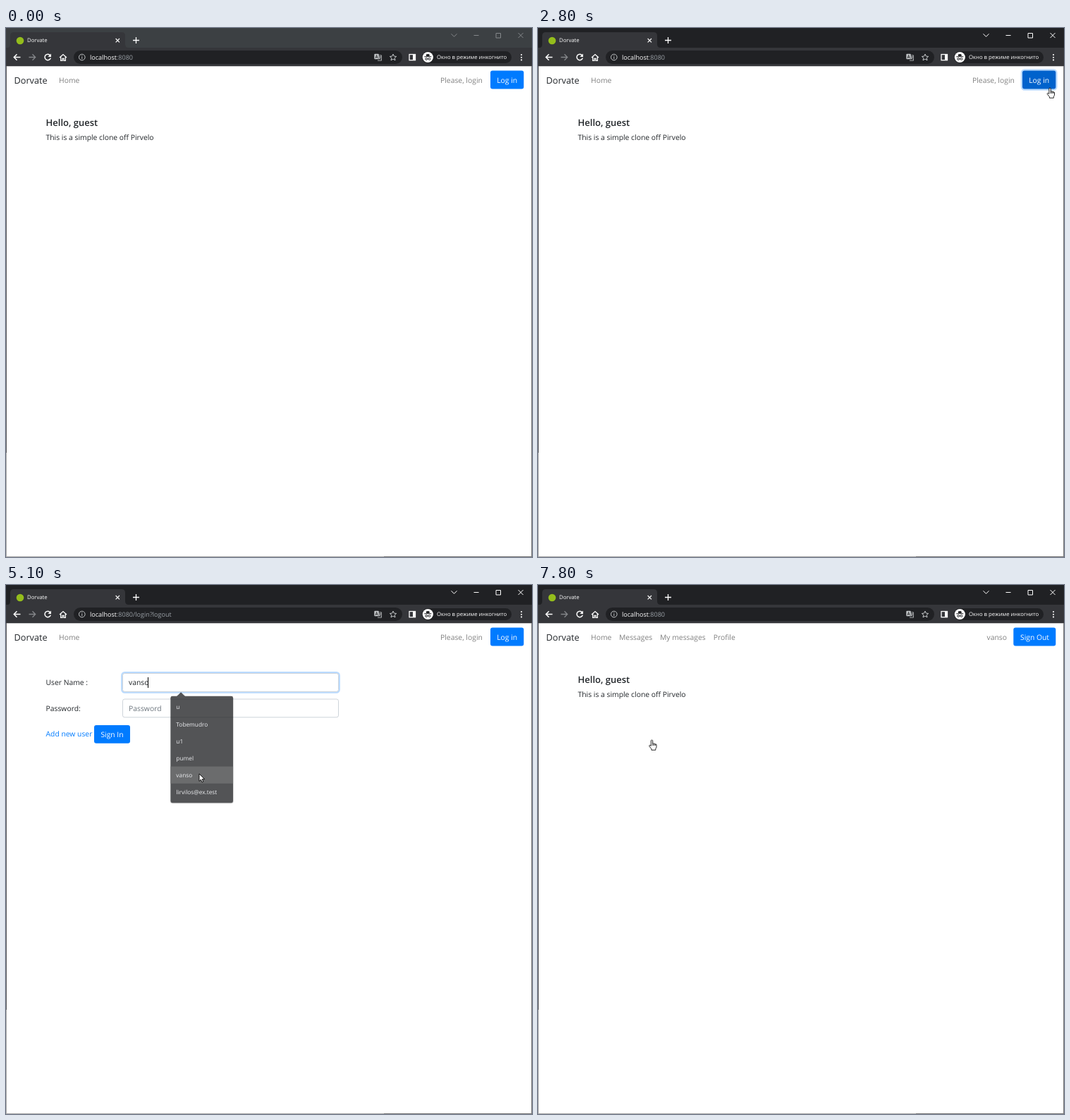
Animation, 746 px wide and 751 px high, one loop 8 s. Source, as an HTML page:

```html
<!DOCTYPE html>
<html lang="en">
<head>
<meta charset="utf-8">
<title>Dorvate</title>
<style>
html, body { margin: 0; width: 100%; height: 100%; overflow: hidden; background: #fff; }
svg { display: block; width: 100%; height: 100%; }
text { font: 10.35px "Open Sans", "Noto Sans", sans-serif; fill: #212529; text-rendering: geometricPrecision; white-space: pre; }
.brand { font-size: 12.7px; }
.head { font-size: 13px; font-weight: 600; }
.ui { font-size: 7.73px; fill: #fff; }
.url { font-size: 9.05px; fill: #fff; }
.nav { fill: #808080; }
.hint { fill: #6c757d; }
.link { fill: #007bff; }
.btn { fill: #fff; text-anchor: middle; }
.small, .menu text { font-size: 8.4px; }
.menu text { fill: #e8eaed; }
.dim { fill: #9aa0a6; }
.line { fill: none; stroke: #fff; stroke-width: 1.3; }
.soft { stroke: #c4c7c9; stroke-width: 1; }
.field { fill: #fff; stroke: #ced4da; }
.ring { fill: none; stroke: #007bff; stroke-opacity: .27; stroke-width: 2.4; }
</style>
</head>
<body>
<svg viewBox="0 0 746 751" xmlns="http://www.w3.org/2000/svg">
  <rect width="746" height="751" fill="#fff"/>

  <!-- browser frame -->
  <rect id="strip" width="746" height="30"/>
  <path d="M0 28H2Q6 28 6 23V11Q6 6 11 6H164Q169 6 169 11V23Q169 28 174 28H746V54.3H0Z" fill="#35363a"/>
  <circle cx="20" cy="18" r="5.3" fill="#94bd1c"/>
  <text class="ui" x="30" y="20.3">Dorvate</text>
  <path class="line" d="M155.6 15l5.4 5.4M161 15l-5.4 5.4" style="stroke-width:1.1"/>
  <path class="line" d="M180 17.5h9M184.500 13v9"/>
  <g id="controls" fill="none" stroke-width="1">
    <path d="M631.500 8.300l4 4 4-4M663.500 10.500h7M695 7.500h6.500v6.500h-6.500zM726.500 7l7 7M733.500 7l-7 7"/>
  </g>
  <path class="line" d="M20.500 41.500h-9M15.500 37.300l-4.200 4.200 4.200 4.200" style="stroke-width:1.5"/>
  <path class="line" d="M32.500 41.500h9M37.500 37.300l4.200 4.200-4.200 4.200" style="stroke:#85878a"/>
  <path class="line" d="M62.700 39A4.200 4.200 0 1 0 63.300 42.600" style="stroke-width:1.5"/>
  <path d="M64 36.500v4.500h-4.500z" fill="#fff"/>
  <path class="line" d="M76 42l5-4.500 5 4.500M77.700 41v5.300h2.300v-3h2v3h2.300v-5.300"/>
  <rect x="96" y="32" width="466" height="19" rx="9.5" fill="#202124"/>
  <circle class="line soft" cx="107.800" cy="41.500" r="4.300"/>
  <path class="line soft" d="M107.800 41v3M107.800 39v1.100"/>
  <text class="url" x="119" y="44.800">localhost<tspan class="dim" id="path"></tspan></text>
  <rect x="522.300" y="36.700" width="6.500" height="7.500" rx="1" fill="#c4c7c9"/>
  <path d="M524 43l1.600-4.700 1.600 4.700M524.500 41.500h2.200" fill="none" stroke="#202124" stroke-width=".8"/>
  <path class="line" d="M529.500 38.800h3v7.400h-5.500M528.800 41h3M530.300 40v1M531.300 41l-2.500 3.600M529.200 41.800l2.200 2.600" style="stroke:#c4c7c9;stroke-width:.8"/>
  <path class="line soft" d="M549 37l1.400 3.100 3.300.3-2.500 2.200.8 3.300-3-1.800-3 1.800.8-3.300-2.500-2.200 3.300-.3z"/>
  <rect class="line" x="572" y="37.500" width="8.500" height="8.200"/>
  <path d="M577 37.500h3.500v8.200h-3.500z" fill="#fff"/>
  <rect x="590" y="33" width="127" height="17" rx="8.500" fill="#202124"/>
  <circle cx="598.300" cy="41.500" r="7.600" fill="#fff"/>
  <path d="M595.700 40l.8-3.300 1.800.5 1.800-.5.8 3.300zM593.300 40.300h10v1h-10z" fill="#202124"/>
  <path d="M594.700 44a1.400 1.400 0 1 0 2.800 0a1.400 1.400 0 1 0-2.800 0M599.100 44a1.400 1.400 0 1 0 2.800 0a1.400 1.400 0 1 0-2.800 0M597.500 43.700h1.600" fill="none" stroke="#202124" stroke-width=".9"/>
  <text class="ui" x="611" y="44.300">Окно в режиме инкогнито</text>
  <g fill="#fff"><circle cx="731" cy="38" r="1.050"/><circle cx="731" cy="41.700" r="1.050"/><circle cx="731" cy="45.400" r="1.050"/></g>

  <!-- page header -->
  <text class="brand" x="11.500" y="78.700">Dorvate</text>
  <text class="nav" x="75" y="77.800">Home</text>
  <g id="member">
    <text class="nav" x="115" y="77.800">Messages</text>
    <text class="nav" x="173" y="77.800">My messages</text>
    <text class="nav" x="248.700" y="77.800">Profile</text>
    <text class="nav" x="636.500" y="77.800">vanso</text>
    <rect x="674.300" y="60.500" width="60" height="26" rx="3" fill="#007bff"/>
    <text class="btn" x="704.500" y="77.800">Sign Out</text>
  </g>
  <g id="visitor">
    <text class="nav" x="616" y="77.800">Please, login</text>
    <rect id="logRing" class="ring" x="686" y="59.500" width="49.300" height="28" rx="4"/>
    <rect id="logBtn" x="687" y="60.500" width="47.300" height="26" rx="3"/>
    <text class="btn" x="710.700" y="77.800">Log in</text>
  </g>

  <g id="home">
    <text class="head" x="56.500" y="139">Hello, guest</text>
    <text x="56.500" y="159.300">This is a simple clone off Pirvelo</text>
  </g>

  <g id="login">
    <text x="56.500" y="142.400">User Name :</text>
    <text x="56.500" y="179">Password:</text>
    <rect id="nameRing" class="ring" x="164.300" y="124.300" width="308.400" height="28.200" rx="4"/>
    <rect id="nameBox" class="field" x="165.500" y="125.500" width="306" height="25.800" rx="2.700"/>
    <text id="nameText" x="174" y="142.400"></text>
    <rect id="passRing" class="ring" x="164.300" y="160.800" width="308.400" height="28.200" rx="4"/>
    <rect id="passBox" class="field" x="165.500" y="162" width="306" height="25.800" rx="2.700"/>
    <text id="passHint" class="hint" x="174" y="179">Password</text>
    <circle id="dot" cx="176.500" cy="175.300" r="1.600" fill="#212529"/>
    <rect id="caret" width="1" height="15" fill="#000"/>
    <text class="link" x="56.500" y="214.500">Add new user</text>
    <rect id="signRing" class="ring" x="124" y="198" width="53" height="27.800" rx="4"/>
    <rect id="signBtn" x="125" y="199" width="51" height="25.700" rx="3"/>
    <text class="btn" x="150.500" y="216">Sign In</text>
  </g>

  <g id="menu" class="menu">
    <rect x="232.500" y="158" width="90.500" height="153" rx="3" fill="#000" opacity=".25"/>
    <path d="M241.500 157.500l6.300-6 6.300 6z" fill="#202124"/>
    <rect x="233" y="157" width="89.500" height="153" rx="2.500" fill="#202124"/>
    <rect id="mark" x="233" width="89.500" height="24.400" fill="#3f4042"/>
  </g>

  <!-- window edges -->
  <path d="M.5 54V603" stroke="#5a5a5c"/>
  <path d="M.5 603V751M0 750.500H536" stroke="#a8a8a8"/>
  <path d="M745.500 54V751M536 750.500H746" stroke="#777"/>

  <g id="arrow"><path d="M0 0V10.500L2.400 8.300 4 12 5.800 11.200 4.200 7.700H7.600Z" fill="#fff" stroke="#000" stroke-width=".9"/></g>
  <g id="beam" fill="none">
    <path d="M-3-5.200h6M-3 5.200h6M0-5.200V5.200" stroke="#fff" stroke-width="3"/>
    <path d="M-3-5.200h6M-3 5.200h6M0-5.200V5.200" stroke="#000" stroke-width="1.500"/>
  </g>
  <g id="hand"><path d="M-1.200 8.500V.8Q0-.8 1.200.8V5Q2.300 4.200 3 5.400 4.200 4.600 4.900 5.900 6.300 5.400 6.500 7V10.300L5.300 12.500V14.300H-.6V12.700L-3.800 8.700Q-3.700 7-2.300 7.600ZM1.200 5V8M3 5.400V8M4.900 5.900V8" fill="#fff" stroke="#000" stroke-width=".85" stroke-linejoin="round"/></g>
</svg>
<script>
const LOOP = 8000, STEP = 100;
const BLUE = '#007bff', HOVER = '#0069d9', PRESSED = '#0062cc';
const ITEMS = ['u', 'Tobemudro', 'u1', 'pumel', 'vanso', 'lirvilos@ex.test'];
const ROW = 24.4, MENU_TOP = 160.3;

// pointer hot spot: time, x, y
const MOVES = [
  [200, 27, 78], [300, 110, 235], [400, 230, 334], [500, 345, 292], [600, 414, 229],
  [800, 414, 229], [1200, 461, 218], [1300, 461, 218], [1900, 709, 75],
  [2100, 709, 75], [2400, 726, 85], [2900, 726, 85], [3600, 277, 141.5],
  [4100, 277, 141.5], [4300, 274, 171.5], [4700, 274, 268], [5300, 274, 268],
  [5500, 243, 175], [6200, 243, 175], [6600, 181, 229], [6700, 181, 229],
  [6800, 164, 224], [6900, 161.5, 220]
];

const el = {};
document.querySelectorAll('[id]').forEach(n => el[n.id] = n);
const show = (n, on) => n.setAttribute('visibility', on ? 'visible' : 'hidden');
const display = (n, on) => n.style.display = on ? '' : 'none';
const set = (n, attrs) => { for (const k in attrs) n.setAttribute(k, attrs[k]); };
const within = (t, a, b) => t >= a && t < b;

ITEMS.forEach((name, i) => {
  const label = document.createElementNS('http://www.w3.org/2000/svg', 'text');
  set(label, { x: 241, y: 175.800 + i * ROW });
  label.textContent = name;
  el.menu.append(label);
});

function pointer(t) {
  const i = MOVES.findIndex(m => m[0] > t);
  if (i < 0) return MOVES[MOVES.length - 1].slice(1);
  if (i === 0) return [-50, -50];
  const [ta, xa, ya] = MOVES[i - 1], [tb, xb, yb] = MOVES[i];
  const p = (t - ta) / (tb - ta), e = p * p * (3 - 2 * p);
  return [xa + (xb - xa) * e, ya + (yb - ya) * e];
}

function field(ring, box, t, from, to, fill) {
  const on = within(t, from, to);
  show(ring, on);
  ring.setAttribute('opacity', t === from ? .55 : 1);
  set(box, { stroke: on ? '#80bdff' : '#ced4da', fill });
}

function caretAt(t) {
  if (within(t, 3800, 4400) || within(t, 4900, 5000)) return [174, 131];
  if (within(t, 5000, 5500)) return [201, 131];
  if (within(t, 5700, 6100)) return [174, 167];
  if (within(t, 6100, 6600) || within(t, 7200, 7400)) return [178, 167];
  return null;
}

function draw(t) {
  const [x, y] = pointer(t);
  const over = (l, top, r, b) => x >= l && x <= r && y >= top && y <= b;
  const focused = t >= 2800, login = within(t, 3000, 7600), member = t >= 7600;

  el.strip.setAttribute('fill', focused ? '#202124' : '#3c4043');
  el.controls.setAttribute('stroke', focused ? '#fff' : '#85888b');
  el.path.textContent = login ? ':8080/login?logout' : ':8080';
  display(el.home, !login);
  display(el.login, login);
  display(el.member, member);
  display(el.visitor, !member);

  const onLog = !member && over(687, 60, 734, 87);
  const onSign = login && over(125, 199, 176, 225);
  el.logBtn.setAttribute('fill', within(t, 2800, 3000) ? PRESSED : onLog ? HOVER : BLUE);
  display(el.logRing, within(t, 2800, 3000));
  el.signBtn.setAttribute('fill', t >= 7400 ? PRESSED : onSign && t > 6800 ? HOVER : BLUE);
  display(el.signRing, t >= 7400);

  // suggestion list and the name it previews
  const open = within(t, 4000, 5200), fading = t >= 5100;
  const row = t >= 4300 ? Math.max(0, Math.min(5, Math.floor((y - MENU_TOP) / ROW))) : -1;
  display(el.menu, open);
  el.menu.setAttribute('opacity', fading ? .77 : 1);
  el.menu.setAttribute('transform', fading ? 'translate(277.800 233.500) scale(.99) translate(-277.800 -233.500)' : '');
  display(el.mark, row >= 0);
  el.mark.setAttribute('y', MENU_TOP + row * ROW);

  const chosen = t >= 5000, preview = row >= 0 && !chosen;
  el.nameText.textContent = chosen ? ITEMS[4] : preview ? ITEMS[row] : 'User name';
  el.nameText.setAttribute('class', preview ? 'small' : chosen ? '' : 'hint');
  field(el.nameRing, el.nameBox, t, 3800, 5700, chosen || preview ? '#e8f0fe' : '#fff');
  field(el.passRing, el.passBox, t, 5700, 7400, '#fff');
  display(el.passHint, t < 6100);
  display(el.dot, t >= 6100);

  const caret = caretAt(t);
  display(el.caret, caret);
  if (caret) set(el.caret, { x: caret[0], y: caret[1] });

  const onField = login && (over(165, 125, 472, 151) || over(165, 162, 472, 188)) && !(open && y > 157);
  const kind = onLog || onSign || t >= 6800 ? 'hand' : onField ? 'beam' : 'arrow';
  for (const k of ['arrow', 'beam', 'hand']) {
    display(el[k], k === kind);
    el[k].setAttribute('transform', `translate(${x} ${y})`);
  }
}

function tick() {
  draw(Math.floor(performance.now() % LOOP / STEP) * STEP);
  requestAnimationFrame(tick);
}
tick();
</script>
</body>
</html>
```
